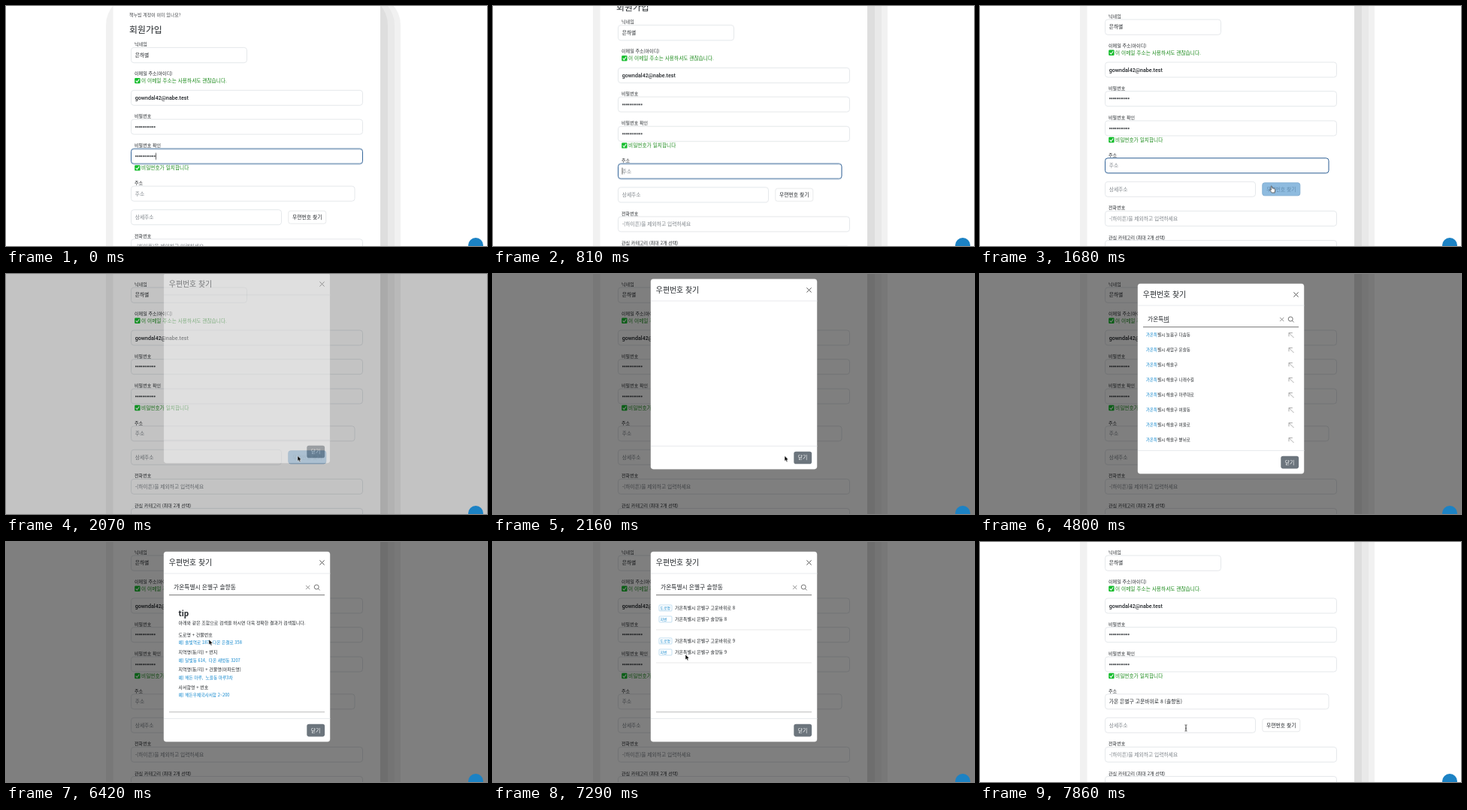
Animation of 640 by 320 pixels, one loop 8000 ms. Source, as an HTML page:

```html
<!DOCTYPE html>
<html lang="ko">
<head>
<meta charset="utf-8">
<title>회원가입</title>
<style>
  html, body { margin: 0; width: 100%; height: 100%; overflow: hidden; background: #fff; }
  svg { display: block; width: 100vw; height: 100vh; }
  text { font-family: "Noto Sans CJK KR", "Noto Sans CJK", sans-serif; fill: #212529; white-space: pre; }
  .latin { font-family: Roboto, "Noto Sans CJK KR", sans-serif; }
  .dots { stroke: #212529; stroke-width: .35; }
  .hint { fill: #7b8187; }
  .ok { fill: #1a8a1a; }
  .blue { fill: #0b84cc; }
  .field { fill: #fff; stroke: #e3e6e9; stroke-width: .9; }
  .ring { fill: none; stroke: #34669b; }
  .line { fill: none; stroke: #666; stroke-width: .9; }

  #page, #backdrop, #modal, #slide, #cursor, #findBox, #findText,
  #oldFocus, #newFocus, #newCaret { animation: 8s linear infinite; }
  #page { animation-name: scroll; }
  #backdrop { animation-name: dim; }
  #modal { animation-name: fade; }
  #slide { animation-name: slide; }
  #cursor { animation-name: point; }
  #findBox { animation-name: findBox; }
  #findText { animation-name: findText; }
  #oldFocus { animation-name: oldFocus; animation-timing-function: step-end; }
  #newFocus { animation-name: newFocus; animation-timing-function: step-end; }
  #newCaret { animation-name: newCaret; animation-timing-function: step-end; }

  @keyframes scroll {
    0% { transform: translateY(37.4px); }
    6% { transform: translateY(37.4px); animation-timing-function: ease-in-out; }
    12%, 100% { transform: none; }
  }
  @keyframes dim {
    0%, 25%, 98.25%, 100% { opacity: 0; }
    26.875%, 96.5% { opacity: .5; }
  }
  @keyframes fade {
    0%, 25%, 96.75%, 100% { opacity: 0; }
    26.875%, 94.875% { opacity: 1; }
  }
  @keyframes slide {
    0% { transform: translateY(-22px); }
    25% { transform: translateY(-22px); animation-timing-function: ease-out; }
    28.75% { transform: none; }
    94.875% { transform: none; animation-timing-function: ease-out; }
    98.6%, 100% { transform: translateY(-22px); }
  }
  @keyframes point {
    0%, 17.25% { transform: translate(470px, 322px); animation-timing-function: ease-out; }
    20.5%, 27.375% { transform: translate(388px, 242.5px); animation-timing-function: ease-in-out; }
    35.6%, 76.125% { transform: translate(294px, 62px); }
    80.25%, 83% { transform: translate(270px, 130px); }
    85.9%, 86.25% { transform: translate(298px, 186px); }
    91.125%, 94.875% { transform: translate(256px, 150px); }
    98%, 100% { transform: translate(274px, 247.5px); }
  }
  @keyframes findBox {
    0%, 19.5%, 30%, 100% { fill: #fff; stroke: #e8eaec; }
    21.2%, 29.9% { fill: #80b3db; stroke: #78a8d0; }
  }
  @keyframes findText {
    0%, 19.5%, 30%, 100% { fill: #212529; }
    21.2%, 29.9% { fill: #6a9ac2; }
  }
  @keyframes oldFocus { 0% { opacity: 1; } 2.625%, 100% { opacity: 0; } }
  @keyframes newFocus { 0% { opacity: 0; } 2.625% { opacity: 1; } 23.5%, 100% { opacity: 0; } }
  @keyframes newCaret { 0% { opacity: 0; } 2.625% { opacity: 1; } 13.875%, 100% { opacity: 0; } }
</style>
</head>
<body>
<svg id="stage" viewBox="0 0 640 320" preserveAspectRatio="none"></svg>
<script>
const LOOP = 8000;
const QUERY = '가온특별시 은별구 솔향동';
const ADDRESS = '가온 은별구 고운바위로 8 (솔향동)';
const WIDE = ['늘봄구 다솜동', '새암구 윤슬동', '해솔구', '해솔구 나래수길',
  '해솔구 마루대로', '해솔구 여울동', '해솔구 여울로', '해솔구 볕뉘로'];
const NEAR = ['은별구', '은별구 솔향동', '은별구 고운바위로', '은별구 솔향로'];

// Text placed by its left edge and visual middle.
const text = (x, middle, size, content, attrs = '') =>
  `<text x="${x}" y="${middle + size * .37}" font-size="${size}" ${attrs}>${content}</text>`;
const box = (x, y, w, h, attrs = 'class="field"', r = 3.6) =>
  `<rect x="${x}" y="${y}" width="${w}" height="${h}" rx="${r}" ${attrs}/>`;
const path = (d, attrs = 'class="line"') => `<path d="${d}" ${attrs}/>`;
const label = (y, content) => text(171, y, 6.05, content);
const cross = (x, y, r, attrs) =>
  path(`M${x - r} ${y - r}l${2 * r} ${2 * r}m0 ${-2 * r}l${-2 * r} ${2 * r}`, attrs);
const confirmed = (y, content) =>
  box(171.2, y - 3.8, 7.4, 7.4, 'fill="#14bd2c"', 1.2) +
  path(`M172.8 ${y}l1.6 1.9 2.8-4`, 'fill="none" stroke="#fff" stroke-width="1.1"') +
  text(180, y, 6.69, content, 'class="ok"');
const password = y => text(171.7, y, 7.1, '•'.repeat(11), 'class="latin dots" letter-spacing=".08"');

const shade = (right, color) => box(133, -52, right - 133, 480, `fill="${color}"`, 40);

const page = `<g id="page">
  ${shade(525, '#f1f1f1')}
  <g clip-path="url(#rightSide)">${shade(517, '#e9e9e9')}${shade(508, '#dedede')}</g>
  <rect x="142.5" y="-60" width="355.5" height="480" fill="#fff"/>
  ${text(164, -25.4, 6, '책누빔 계정이 이미 있나요?', 'fill-opacity=".85"')}
  ${text(164, -6.2, 11.9, '회원가입', 'font-weight="500"')}
  ${label(13.8, '닉네임')}${box(166.5, 18, 154, 20.3)}
  ${text(171.7, 28, 6.75, '은하별', 'font-weight="500"')}
  ${label(52.8, '이메일 주소(아이디)')}
  ${confirmed(62.3, '이 이메일 주소는 사용하셔도 괜찮습니다.')}
  ${box(166.5, 75, 308, 20)}
  ${text(171.7, 85, 7.1, 'gowndal42@nabe.test', 'class="latin" font-weight="500"')}
  ${label(109.8, '비밀번호')}${box(166.5, 113.7, 308, 20)}${password(123.7)}
  ${label(148.7, '비밀번호 확인')}${box(166.5, 153, 308, 20)}${password(163)}
  ${confirmed(178.6, '비밀번호가 일치합니다')}
  <g id="oldFocus">
    ${box(166.5, 153, 308, 20, 'class="ring"')}
    ${path('M199.5 158.5v9', 'stroke="#222" stroke-width=".7"')}
  </g>
  ${label(198.6, '주소')}${box(166.5, 202.8, 297.5, 20)}
  ${text(171.7, 212.8, 6.75, '주소', 'class="hint" id="addressHint"')}
  ${text(171.7, 212.8, 6.8, ADDRESS, 'font-weight="500" id="address"')}
  <g id="newFocus">${box(166.5, 202.8, 297.5, 20, 'class="ring"')}</g>
  ${path('M172 208v9', 'id="newCaret" stroke="#222" stroke-width=".7"')}
  ${box(166.5, 234.3, 200, 20)}${text(171.7, 244.3, 6.75, '상세주소', 'class="hint"')}
  ${box(375.8, 235.8, 50, 17, 'id="findBox"', 2.8)}
  ${text(381, 244.3, 6.8, '우편번호 찾기', 'id="findText" font-weight="500"')}
  ${label(269, '전화번호')}${box(166.5, 273.4, 308, 20)}
  ${text(171.7, 283.4, 6.75, '-(하이픈)을 제외하고 입력하세요', 'class="hint"')}
  ${label(308.3, '관심 카테고리 (최대 2개 선택)')}${box(166.5, 312.5, 308, 20)}
</g>`;

const tips = [
  ['도로명 + 건물번호', '솔빛역로 187,  다온 은결로 358'],
  ['지역명(동/리) + 번지', '달빛동 614,  다온 새벗동 3207'],
  ['지역명(동/리) + 건물명(아파트명)', '해든 마루,  노을동 마루3차'],
  ['사서함명 + 번호', '해든우체국사서함 2~200']
];
const tipPanel = `<g id="tips">
  ${text(229.5, 95, 10, 'tip', 'font-weight="700"')}
  ${text(229.5, 108, 5.97, '아래와 같은 조합으로 검색을 하시면 더욱 정확한 결과가 검색됩니다.')}
  ${tips.map(([name, example], i) =>
    text(229.5, 124 + i * 23.1, 6, name) +
    text(229.5, 134.3 + i * 23.1, 5.7, '예) ' + example, 'class="blue"')).join('')}
</g>`;

const tag = (y, name) =>
  box(221, y - 4, 17, 8, 'fill="none" stroke="#9cc9e8" stroke-width=".6"', 1) +
  text(222.6, y, 4.8, name, 'class="blue"');
const resultPanel = `<g id="results">
  ${[8, 9].map((number, i) => {
    const y = 88 + i * 44;
    return tag(y, '도로명') + text(242, y, 6, `가온특별시 은별구 고운바위로 ${number}`) +
      tag(y + 15, '지번') + text(242, y + 15, 6, `가온특별시 은별구 솔향동 ${number}`) +
      path(`M217 ${y + 29}h207`, 'stroke="#e4e4e4" stroke-width=".8"');
  }).join('')}
</g>`;

const modal = `<rect id="backdrop" width="640" height="320"/>
<g id="modal"><g id="slide">
  ${box(209.7, 12.7, 221.6, 253.8, 'fill="#fff" stroke="#000" stroke-opacity=".18" stroke-width=".5"', 3.8)}
  ${text(216.8, 27.3, 9.9, '우편번호 찾기', 'font-weight="500"')}
  ${cross(420.5, 27.5, 3.1, 'stroke="#555" stroke-width="1"')}
  ${path('M210 42h221.5M210 235.5h221.5', 'stroke="#dee2e6" stroke-width=".7"')}
  ${box(400.3, 242.8, 23.8, 16.6, 'fill="#6c757d"', 2.8)}
  ${text(405.7, 251, 6.9, '닫기', 'style="fill:#fff"')}
  <g id="finder">
    ${text(225.3, 60.3, 7.5, '예) 솔빛역로 187, 해든 마루, 달빛동 614', 'style="fill:#888" id="queryHint"')}
    ${text(223, 60, 7.75, '', 'id="query"')}
    ${cross(401.7, 60.5, 2.6, 'id="clear" stroke="#777" stroke-width=".8"')}
    <circle cx="413.2" cy="60" r="3" class="line"/>${path('M415.4 62.2l2.2 2.2')}
    ${path('M217 70.7h207')}
    ${tipPanel}${resultPanel}<g id="list"></g>
    ${path('M217 226.7h207', 'id="base" stroke="#aaa" stroke-width=".8"')}
  </g>
</g></g>`;

const cursor = `<g id="cursor">
  ${path('M0 0v7l1.6-1.4 1.1 2.5 1.3-.6-1.1-2.4h2.2z', 'data-shape="arrow" fill="#000" stroke="#fff" stroke-width=".5"')}
  ${path('M-1 -2q1-1 1.4 0l.6 2.4 3 .8q1 .4.8 1.6l-.6 3.6h-4l-2.6-3.4q-.2-1.2 1-.8l.8.8z', 'data-shape="hand" fill="#fff" stroke="#222" stroke-width=".7"')}
  ${path('M-1.5 -3.6q1.5 0 1.5 1v6.2q0 1-1.5 1m3 0q-1.5 0-1.5-1M1.5-3.6q-1.5 0-1.5 1M-1 1h2', 'data-shape="beam" fill="none" stroke="#222" stroke-width=".8"')}
</g>`;

const $ = id => document.getElementById(id);
$('stage').innerHTML = `<clipPath id="rightSide"><rect x="320" y="-60" width="320" height="500"/></clipPath>
  ${page}${modal}<circle cx="625" cy="319" r="10" fill="#1c82c4"/>${cursor}`;

// Every state of the query while its syllables are composed from letters.
function compose(target) {
  const leads = 'ㄱㄲㄴㄷㄸㄹㅁㅂㅃㅅㅆㅇㅈㅉㅊㅋㅌㅍㅎ';
  const states = [''];
  let done = '';
  for (const char of target) {
    const code = char.charCodeAt(0) - 0xac00;
    if (code >= 0) {
      states.push(done + leads[Math.floor(code / 588)]);
      if (code % 28) states.push(done + String.fromCharCode(0xac00 + code - code % 28));
    }
    states.push(done += char);
  }
  return states;
}
const states = compose(QUERY);
const pace = [[3620, 1], [3770, 4], [3950, 5], [4730, 10], [4785, 11],
  [4860, 12], [4970, 13], [5240, 14], [5900, states.length - 1]];

function typedCount(t) {
  if (t < pace[0][0]) return 0;
  const next = pace.findIndex(([time]) => time > t);
  if (next < 0) return states.length - 1;
  const [t0, n0] = pace[next - 1], [t1, n1] = pace[next];
  return Math.floor(n0 + (n1 - n0) * (t - t0) / (t1 - t0));
}

function suggestion(name, i, typed) {
  const full = '가온특별시 ' + name, y = 81 + i * 20;
  let match = 0;
  while (match < typed.length && full[match] === typed[match]) match++;
  return text(221, y, 5.5, `<tspan class="blue">${full.slice(0, match)}</tspan>${full.slice(match)}`) +
    path(`M417.5 ${y + 4}l-6.5-6.5m0 4.8v-4.8h4.8`, 'fill="none" stroke="#999" stroke-width=".8"');
}

let shown = -1;
function showTyping(count) {
  if (count === shown) return;
  shown = count;
  const typed = states[count], finished = count === states.length - 1;
  $('query').innerHTML = finished || typed.endsWith(' ') ? typed :
    `${typed.slice(0, -1)}<tspan text-decoration="underline">${typed.slice(-1)}</tspan>`;
  const names = typed.length > 6 ? NEAR : WIDE;
  $('list').innerHTML = count < 2 || finished ? '' :
    names.map((name, i) => suggestion(name, i, typed)).join('');
}

function cursorShape(t) {
  if (t < 1380 || t >= 3630 && t < 6090) return '';
  if (t >= 1600 && t < 1980) return 'hand';
  return t >= 2750 && t < 3630 || t >= 7740 ? 'beam' : 'arrow';
}

const show = (node, on) => { node.style.display = on ? '' : 'none'; };
const shapes = document.querySelectorAll('[data-shape]');
const clock = $('page').getAnimations()[0];

function draw() {
  const t = (clock.currentTime || 0) % LOOP;
  const count = typedCount(t), listing = count > 1 && count < states.length - 1;
  const found = t >= 6660, chosen = t >= 7590;
  showTyping(count);
  show($('finder'), t >= 2400);
  show($('queryHint'), !count);
  show($('clear'), count);
  show($('tips'), !listing && !found);
  show($('results'), found);
  show($('base'), !listing);
  show($('address'), chosen);
  show($('addressHint'), !chosen);
  const shape = cursorShape(t);
  shapes.forEach(node => show(node, node.dataset.shape === shape));
  requestAnimationFrame(draw);
}
draw();
</script>
</body>
</html>
```
